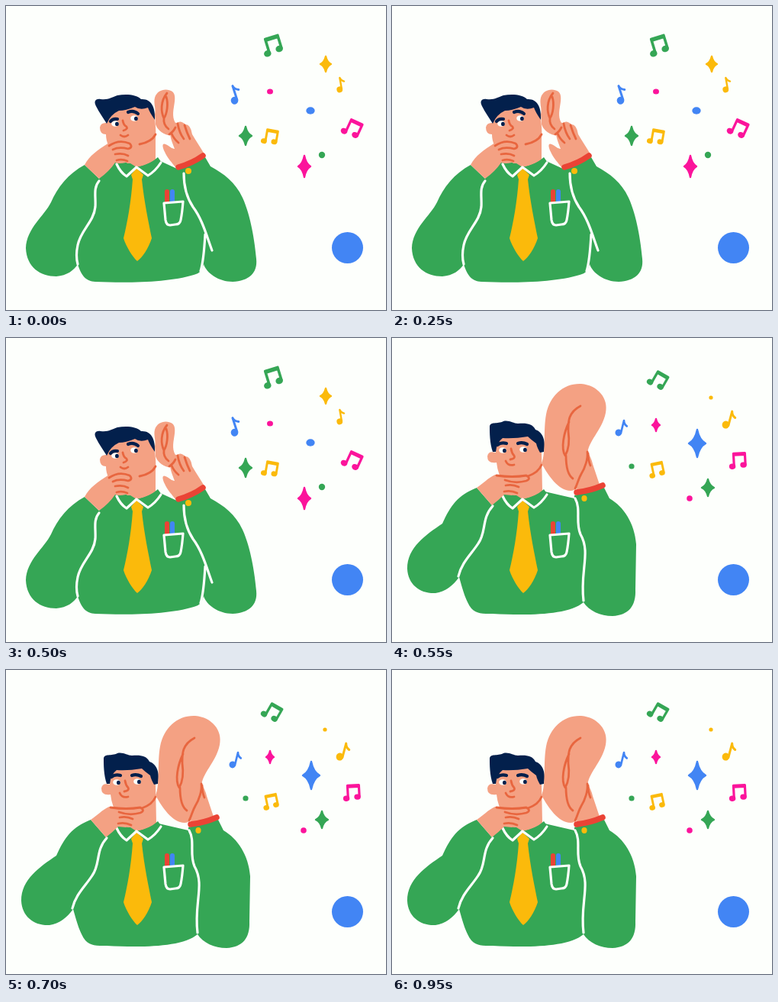
These frames come from a looping animation (498x398 px, 1000 ms). An HTML page:

```html
<!DOCTYPE html>
<html lang="en">
<head>
<meta charset="utf-8">
<title>Listening</title>
<style>
html, body { margin: 0; width: 100%; height: 100%; overflow: hidden; background: #fdfffc; }
svg { display: block; width: 100vw; height: 100vh; }
path { stroke-linecap: round; stroke-linejoin: round; }
.line { fill: none; stroke: #e8663f; stroke-width: 2.8; }
.white { fill: none; stroke: #fdfffc; stroke-width: 3.2; }
.brow { fill: none; stroke: #03204c; stroke-width: 4.2; }
.cuff { fill: none; stroke: #ea4335; stroke-width: 7.5; }
</style>
</head>
<body>
<svg id="stage" viewBox="0 0 498 398"></svg>
<script>
const green = '#35a655', skin = '#f4a183', navy = '#03204c', red = '#ea4335',
  blue = '#4285f4', yellow = '#fbba0b', pink = '#fb149b', white = '#fdfffc';

const fill = (d, c, edge = 0) => `<path d="${d}" fill="${c}" stroke="${c}" stroke-width="${edge}"/>`;
const line = (d, kind = 'line') => `<path d="${d}" class="${kind}"/>`;
const dot = (x, y, c, rx, ry = rx) => `<ellipse cx="${x}" cy="${y}" rx="${rx}" ry="${ry}" fill="${c}"/>`;
const place = (x, y, turn, size, s) => `<g transform="translate(${x} ${y}) rotate(${turn}) scale(${size})">${s}</g>`;

const sparkle = (x, y, c, w, h) => place(x, y, 0, 1, fill(
  `M0 ${-h}Q${w * .25} ${-h * .25} ${w} 0Q${w * .25} ${h * .25} 0 ${h}` +
  `Q${-w * .25} ${h * .25} ${-w} 0Q${-w * .25} ${-h * .25} 0 ${-h}Z`, c, 2.4));

const pair = (x, y, c, turn, size) => place(x, y, turn, size,
  `<path d="M-7 9V-9H10V8M-7-8H10M-7-7H10" fill="none" stroke="${c}" stroke-width="3.6"/>` +
  dot(-9.5, 10, c, 4.8, 4.2) + dot(7, 8.5, c, 4.8, 4.2));

const single = (x, y, c, turn, size) => place(x, y, turn, size,
  `<path d="M3 8V-11Q4-6 9-4" fill="none" stroke="${c}" stroke-width="3"/>` + dot(-.5, 8, c, 4.8, 5));

const eye = (x, y) => dot(x, y, white, 4.8, 3.8) + dot(x + 2.4, y + .4, navy, 2.4, 2.7);

const pocket = 'M207 258L232 256Q231 270 229 280Q228 286 222 286L215 287Q210 287 209 280Z';

const shirtFront = () =>
  fill('M145 206Q150 217 157 223L171 211L163 206ZM171 211L186 222Q197 213 204 205L199 198Q188 208 171 211Z', green) +
  fill('M171 212L180 221L178 227C181 256 187 284 191 304C187 317 178 330 172 334C166 329 157 314 154 304C159 284 164 256 166 227L164 221Z', yellow) +
  line('M145 207Q150 218 158 223L171 211L186 222Q196 216 203 205', 'white') +
  fill('M208 257V243Q208 240 211 240Q214 240 214 243V257Z', red) +
  fill('M215 257V243Q215 240 218 240Q221 240 221 243V257Z', blue) +
  fill(pocket, green) + line(pocket, 'white');

const smallEar = () =>
  fill('M103 208C82 219 67 238 59 257C50 275 27 291 26 317C27 342 45 354 66 354C80 353 89 346 94 338C99 354 105 360 117 361C160 363 213 362 246 352C255 350 257 345 259 338C263 350 279 361 297 361C318 360 330 350 328 331C326 309 321 275 310 251C300 230 286 220 268 210L261 198L224 213L200 202L147 203L135 205L122 226Z', green) +
  // head
  fill('M133 153L126 142L150 128L189 130C196 146 197 160 196 174V201Q184 209 171 211L160 207L146 195Q131 185 131 168Q123 168 123 159Q124 152 133 153Z', skin) +
  fill('M132 154C127 146 122 139 119 133C114 125 117 121 124 122C135 123 137 120 146 117C158 115 171 116 177 122C190 121 196 132 195 149Q188 139 186 133Q176 137 169 132Q157 137 148 137Q137 142 132 154Z', navy) +
  eye(143, 154) + eye(168, 147) +
  line('M137 151Q140 147 146 148M160 139Q167 136 173 141', 'brow') +
  line('M153 150Q154 156 158 158Q160 161 154 163M150 169Q155 173 160 169M175 181Q191 178 196 168') +
  shirtFront() +
  // ear
  fill('M195 142C197 135 193 127 195 120C198 109 211 107 218 112C223 116 221 125 220 132C218 143 219 151 225 157C225 164 220 170 212 169C204 167 198 161 196 155Z', skin) +
  line('M211 114C202 125 203 139 207 147C211 141 213 128 210 119M207 147C206 154 209 158 213 161') +
  // hands
  fill('M103 208C109 196 121 188 132 181C139 176 150 175 160 178Q167 181 164 187Q166 192 161 196Q163 203 157 205Q148 207 143 205Q135 217 122 226Z', skin) +
  line('M135 183Q148 174 162 180Q167 185 160 187Q148 184 140 188M143 194Q153 192 160 196M145 202Q152 200 159 203') +
  fill('M223 212C218 206 211 198 208 191C204 183 205 179 209 181C214 183 217 187 221 187C218 179 214 170 215 162Q216 151 224 153Q229 149 235 155Q242 155 244 168C249 177 255 185 260 194Z', skin) +
  line('M217 167Q220 174 226 179M225 154Q227 166 233 174M234 156Q237 166 241 174M214 168Q219 165 222 159') +
  line('M226 211Q244 206 258 196', 'cuff') + dot(239, 216, yellow, 4) +
  line('M122 229C114 238 118 250 117 263C115 283 98 293 94 313Q91 327 94 338M233 219C233 233 235 248 245 263C257 279 262 298 270 320M261 299C260 317 259 334 255 347', 'white') +
  pair(349, 50, green, -17, 1) + pair(347, 170, yellow, 10, .82) + pair(455, 159, pink, 25, .93) +
  single(297.5, 116, blue, -18, 1) + single(436.5, 103, yellow, -10, .8) +
  sparkle(419, 76, yellow, 7, 10) + sparkle(314, 170, green, 8, 12) + sparkle(391, 210, pink, 8, 14) +
  dot(346, 112, pink, 4, 3.5) + dot(399, 137, blue, 5.7, 4.7) + dot(414, 195, green, 4.2);

const bigEar = () =>
  fill('M111 196C86 206 77 219 66 243C44 258 20 274 20 302C21 323 37 335 57 334C70 332 80 324 88 313C93 331 97 345 104 354C110 361 119 361 132 361C173 363 230 364 251 346C258 357 273 364 289 364C310 363 320 351 319 329L320 270C318 243 304 221 285 210L278 196L239 206L239 210L200 201L147 202L135 207L131 219Z', green) +
  // head
  fill('M136 143L140 124L186 124L196 150L197 201Q184 209 171 211L160 207L146 187Q139 180 137 163Q125 165 125 155Q126 147 136 150Z', skin) +
  fill('M132 149C128 137 128 124 128 116C129 109 138 113 146 109C153 107 159 112 165 112C176 111 184 112 188 120C198 123 202 136 199 149L194 150Q190 143 189 138Q182 133 178 129Q160 132 145 131Q137 137 136 149Z', navy) +
  eye(145, 147) + eye(172, 146) +
  line('M138 140Q143 136 150 138M165 138Q171 136 177 139', 'brow') +
  line('M156 145Q157 151 160 154Q162 158 155 159M149 161Q152 168 160 166M178 181Q192 176 196 166') +
  shirtFront() +
  // ear and the hand behind it
  fill('M243 204L240 180L255 147Q261 156 263 165L273 195Z', skin) +
  fill('M196 164C202 151 198 121 202 100C207 75 225 59 248 60C270 62 284 79 280 98C275 122 256 135 256 154C255 178 247 200 234 200C218 200 204 179 196 164Z', skin) +
  line('M247 89C230 98 231 111 231 122C233 136 231 147 227 154C221 145 225 124 232 110M228 154C228 168 230 179 237 184M256 149C257 158 253 170 248 178C244 185 243 191 240 197M257 151Q257 160 260 167') +
  line('M242 202Q260 200 276 193', 'cuff') + dot(252, 210, yellow, 3.6, 4) +
  fill('M111 196C119 191 126 183 135 179C149 181 163 180 176 180Q183 183 178 187L166 190Q169 197 165 199Q166 205 157 206L147 205Q140 212 131 219Z', skin) +
  line('M137 180Q158 183 176 180Q183 184 176 187Q162 191 148 186M149 193Q158 191 166 195M147 201Q156 199 164 203') +
  line('M132 220C117 236 124 254 113 269C104 283 91 294 87 312M240 210C248 224 240 241 247 257C261 281 246 306 251 344', 'white') +
  pair(350, 54, green, 30, .9) + pair(347, 171, yellow, -12, .8) + pair(454, 159, pink, -3, .88) +
  single(299, 117, blue, 14, .9) + single(440, 106, yellow, 15, 1) +
  sparkle(346, 114, pink, 5, 8) + sparkle(400, 138, blue, 11, 18) + sparkle(414, 196, green, 8, 11) +
  dot(418, 78, yellow, 2.6) + dot(314, 168, green, 3.6) + dot(390, 210, pink, 3.8);

const stage = document.getElementById('stage');
stage.innerHTML = `<g>${smallEar()}</g><g>${bigEar()}</g>` + dot(447.5, 316.5, blue, 20.5);
const [small, big] = stage.children;

function draw(now) {
  const grown = now % 1000 >= 550;
  small.style.display = grown ? 'none' : '';
  big.style.display = grown ? '' : 'none';
  requestAnimationFrame(draw);
}
draw(performance.now());
</script>
</body>
</html>
```
